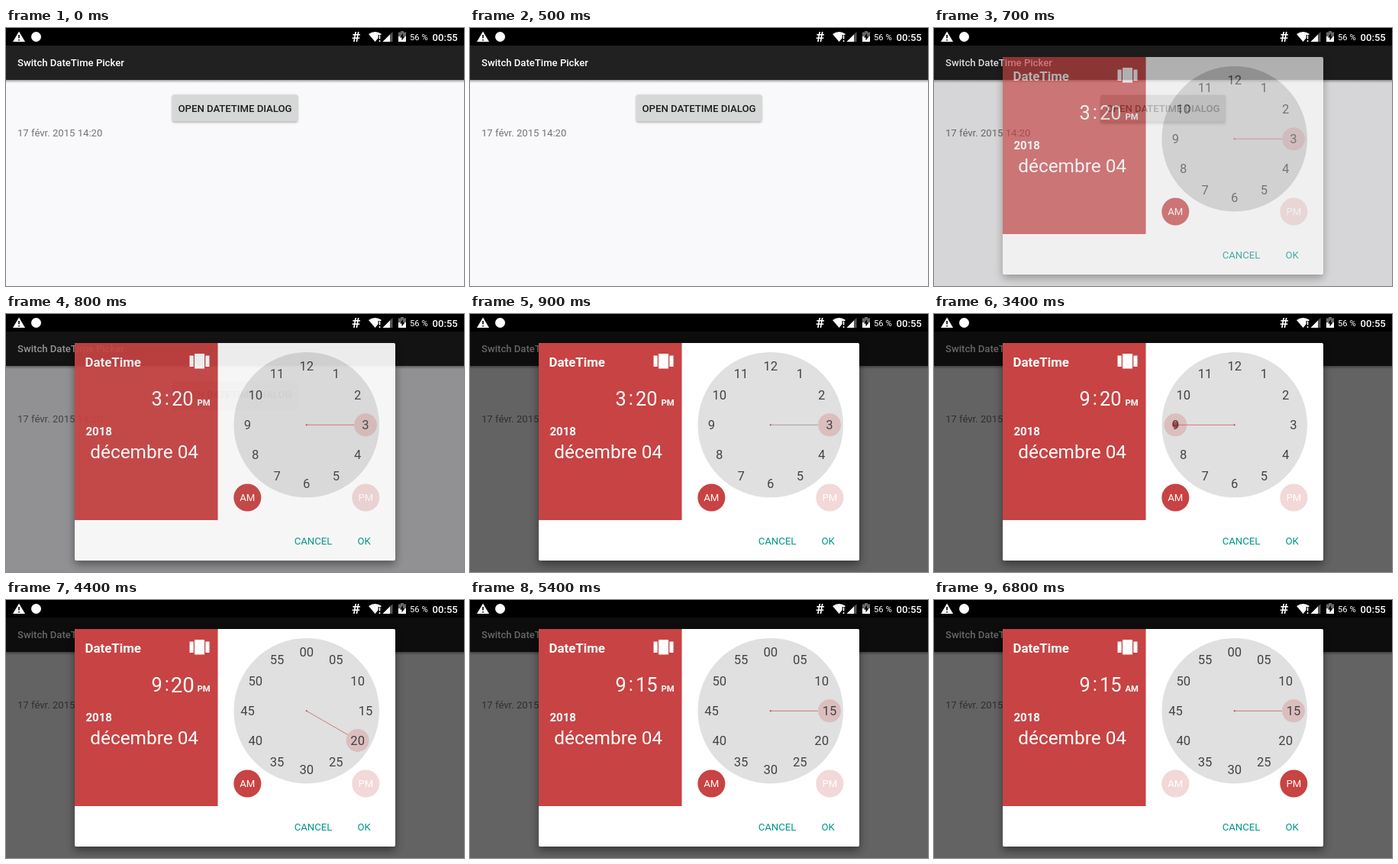
Animation, 600 px wide and 338 px high, one loop 8 s. Source, as an HTML page:

```html
<!DOCTYPE html>
<html lang="en">
<head>
<meta charset="utf-8">
<title>Switch DateTime Picker</title>
<style>
  html, body { margin: 0; width: 100%; height: 100%; overflow: hidden; background: #f9f8fa; }
  svg { display: block; width: 100%; height: 100%; }
  text { font: 13.125px Roboto, sans-serif; }
  .mid { text-anchor: middle; }
  .medium { font-weight: 500; }
  .bold { font-weight: 700; }
  .small { font-size: 11.25px; }
  .time { font-size: 25.3px; }
  .num { font-size: 16.5px; fill: #424242; text-anchor: middle; }
</style>
</head>
<body>
<svg viewBox="0 0 600 338">
  <defs>
    <linearGradient id="fade" x2="0" y2="1">
      <stop stop-color="#000" stop-opacity=".35"/>
      <stop offset="1" stop-color="#000" stop-opacity="0"/>
    </linearGradient>
    <filter id="soft" x="-20%" y="-40%" width="140%" height="180%"><feGaussianBlur stdDeviation="1.5"/></filter>
    <filter id="softer"><feGaussianBlur stdDeviation="6"/></filter>
  </defs>

  <!-- page -->
  <rect width="600" height="338" fill="#f9f8fa"/>
  <rect y="68" width="600" height="4" fill="url(#fade)"/>
  <rect y="23" width="600" height="45" fill="#212121"/>
  <text class="medium" x="15" y="50" fill="#fff">Switch DateTime Picker</text>
  <rect id="lift" x="218" y="88.5" width="164" height="35" rx="2" opacity=".35" filter="url(#soft)"/>
  <rect id="button" x="218" y="87.5" width="164" height="35" rx="2"/>
  <text class="medium mid" x="300" y="110" fill="#1c1c1c">OPEN DATETIME DIALOG</text>
  <text x="15" y="142" fill="#747474">17 févr. 2015 14:20</text>
  <rect id="dim" y="23" width="600" height="315"/>

  <!-- status bar -->
  <rect width="600" height="23"/>
  <g fill="#fff">
    <path d="M17 4.5 25 18H9Z"/>
    <path d="M17 9v4.5M17 15v1.6" stroke="#000" stroke-width="1.6"/>
    <circle cx="39.5" cy="11.5" r="6.5"/>
    <text class="bold" x="453" y="18" font-style="italic" style="font-size:19px">#</text>
    <path d="M475 8Q483.500 2 492 8L483.500 18Z"/>
    <path d="M489.500 9v9" stroke="#000" stroke-width="4"/>
    <path d="M489.500 9.500v5M489.500 16v2" stroke="#fff" stroke-width="1.6"/>
    <path d="M506.500 5v13h-13Z" fill="#555"/>
    <path d="M503 8.500V18h-9.500Z"/>
    <path d="M517 4h4v1.500h3V11h-10V5.500h3Z" fill="#666"/>
    <path d="M514 11h10v7h-10Z"/>
    <path d="M520 7l-4 5.500h2.500V16.500l4-5.500H520Z" fill="#000"/>
    <text class="small" x="529" y="16">56 %</text>
    <text class="medium" x="558.500" y="16.500">00:55</text>
  </g>

  <!-- dialog -->
  <g id="dialog">
    <rect x="90" y="43" width="420" height="285" opacity=".45" filter="url(#softer)"/>
    <rect x="90" y="38" width="420" height="285" rx="2" fill="#fff"/>
    <path d="M277.500 38V270H90V40q0-2 2-2Z" fill="#c84343"/>
    <g fill="#fff">
      <text class="bold" x="103.500" y="69" style="font-size:16.875px">DateTime</text>
      <path transform="translate(237.900 46.800) scale(1.300)" d="M7 19h10V4H7zM2 17h4V6H2zM18 6v11h4V6z"/>
      <text id="hour" class="time" x="204.800" y="120" text-anchor="end"></text>
      <text class="time mid" x="210.700" y="119">:</text>
      <text id="minute" class="time mid" x="231.300" y="120"></text>
      <text id="half" class="bold small" x="250.500" y="120"></text>
      <text class="bold" x="104.500" y="158.500" style="font-size:15px">2018</text>
      <text x="110.300" y="188.500" style="font-size:24.375px">décembre 04</text>
    </g>
    <circle id="face" cx="393.700" cy="145.300" r="95.300"/>
    <g id="dial"></g>
    <circle id="am" cx="316.300" cy="240.500" r="18"/>
    <circle id="pm" cx="471.300" cy="240.500" r="18"/>
    <g class="mid" fill="#fff">
      <text x="316.300" y="245.200">AM</text>
      <text x="471.300" y="245.200">PM</text>
    </g>
    <g class="medium mid" fill="#009688">
      <text x="402.500" y="301.700">CANCEL</text>
      <text x="469" y="301.700">OK</text>
    </g>
  </g>
</svg>
<script>
const $ = id => document.getElementById(id);
const RED = '#c84343', PALE = '#f2d8d8';
const CX = 393.7, CY = 145.3, R = 77.3;
const SWITCH = 3750;   // hours give way to minutes

const clamp = p => Math.max(0, Math.min(1, p));
const ease = p => (1 - Math.cos(Math.PI * clamp(p))) / 2;

// Linear interpolation through [position, value] pairs.
function keys(p, list) {
  for (let i = 1; i < list.length; i++) {
    const [a, u] = list[i - 1], [b, v] = list[i];
    if (p <= b) return u + (v - u) * clamp((p - a) / (b - a));
  }
  return list[list.length - 1][1];
}

// Last value whose start time has passed.
const step = (t, list) => list.reduce((v, [at, next]) => t >= at ? next : v, list[0][1]);

const polar = (deg, r) => {
  const a = deg * Math.PI / 180;
  return [CX + r * Math.sin(a), CY - r * Math.cos(a)];
};

function ring(label, angle, scale, alpha, dragging, line) {
  if (alpha <= 0) return '';
  const r = R * scale;
  const [x, y] = polar(angle, r);
  const [ex, ey] = polar(angle, dragging ? r : r - 15);
  let s = `<g opacity="${alpha}"><circle cx="${x}" cy="${y}" r="15" fill="${RED}" opacity=".22"/>
    <path d="M${CX} ${CY}L${ex} ${ey}" stroke="${line}" stroke-width=".9"/>
    <circle cx="${CX}" cy="${CY}" r="1.1" fill="#a55"/>`;
  if (dragging) s += `<circle cx="${x}" cy="${y}" r="4.3" fill="${RED}"/>`;
  for (let i = 0; i < 12; i++) {
    const [nx, ny] = polar(i * 30, r);
    s += `<text class="num" x="${nx}" y="${ny + 5.8}">${label(i)}</text>`;
  }
  return s + '</g>';
}

const hourLabel = i => i || 12;
const minuteLabel = i => String(i * 5).padStart(2, '0');

function draw(t) {
  const hour = step(t, [[0, 3], [2800, 4], [2900, 5], [3000, 6], [3100, 7], [3200, 8], [3400, 9]]);
  const minute = step(t, [[0, 20], [5200, 18], [5300, 16], [5400, 15]]);
  const flipped = t >= 6800;
  const pressed = t >= 700;

  $('button').setAttribute('fill', pressed ? '#bdbdbd' : '#d6d7d7');
  $('lift').setAttribute('y', pressed ? 90.5 : 88.5);
  $('dim').setAttribute('opacity', step(t, [[0, 0], [700, .14], [800, .42], [900, .6]]));
  $('dialog').setAttribute('opacity', step(t, [[0, 0], [700, .65], [800, .92], [900, 1]]));
  $('face').setAttribute('fill', step(t, [[0, '#cfcfcf'], [800, '#e0e0e0']]));

  $('hour').textContent = hour;
  $('minute').textContent = minute;
  $('half').textContent = flipped ? 'AM' : 'PM';
  $('am').setAttribute('fill', flipped ? PALE : RED);
  $('pm').setAttribute('fill', flipped ? RED : PALE);

  const pulse = keys(ease((t - SWITCH - 300) / 544), [[0, 1], [.275, .85], [.69, 1.1], [1, 1]]);
  $('minute').setAttribute('transform', `translate(231.3 111) scale(${pulse}) translate(-231.3 -111)`);

  const out = ease((t - SWITCH) / 500), into = ease((t - SWITCH) / 625);
  const line = t >= 900 && t < 2800 ? '#a99090' : '#d06a6a';
  $('dial').innerHTML =
    ring(hourLabel, hour * 30, keys(out, [[0, 1], [.2, .95], [1, 1.3]]), 1 - out,
      t >= 2800 && t < 3500, line) +
    ring(minuteLabel, minute * 6, keys(into, [[.2, .7], [.84, 1.05], [1, 1]]), keys(into, [[.2, 0], [1, 1]]),
      t >= 5200 && t < 5400, line);
}

let start, last;
function tick(now) {
  start ??= now;
  const t = Math.floor((now - start) % 8000 / 100) * 100;
  if (t !== last) draw(last = t);
  requestAnimationFrame(tick);
}
draw(0);
requestAnimationFrame(tick);
</script>
</body>
</html>
```
